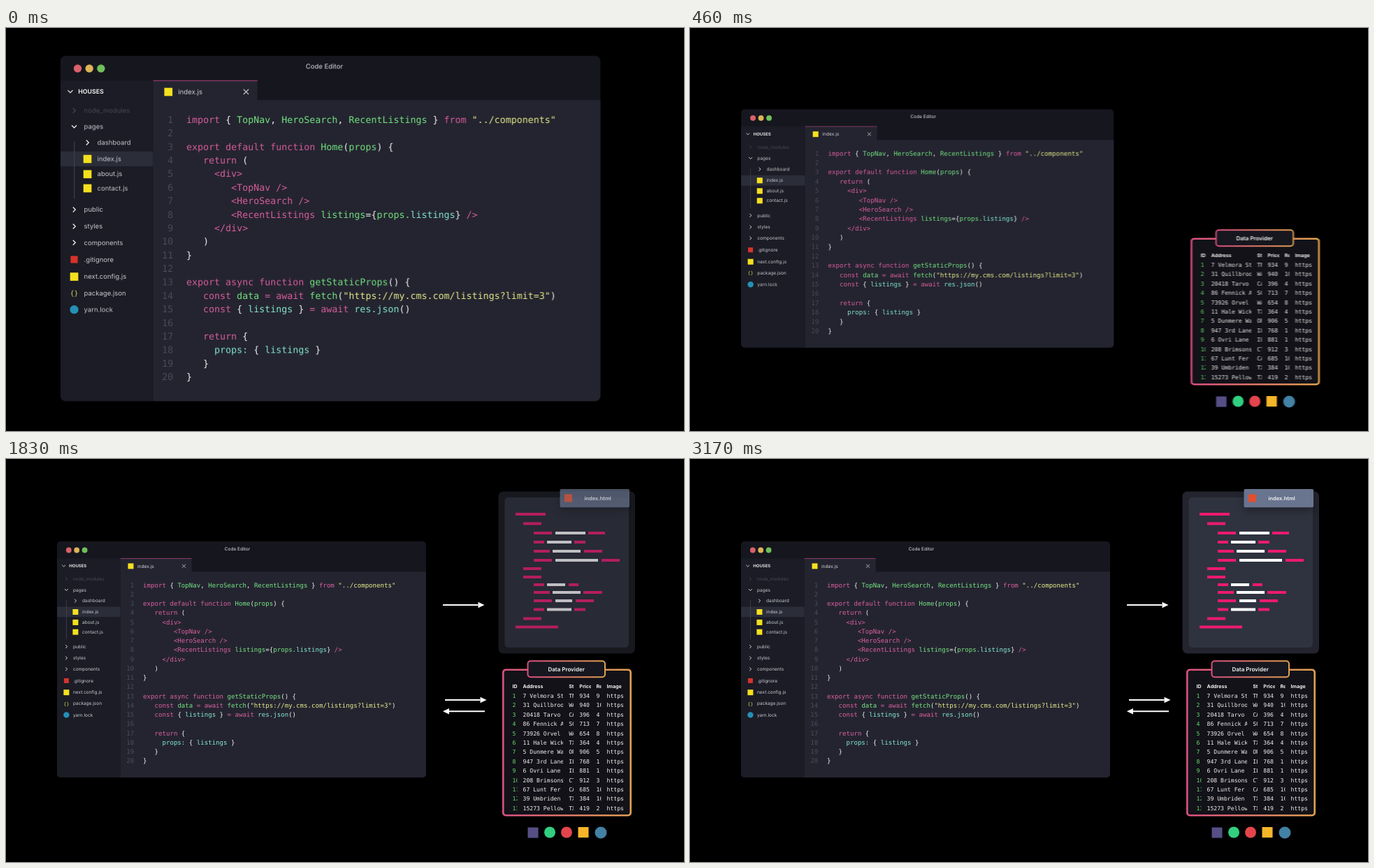
Write an HTML page with a canvas that moves like this. It is 970x577 px and loops after 3.25 s.

```html
<!DOCTYPE html>
<html lang="en">
<head>
<meta charset="utf-8">
<title>Code editor and data provider</title>
<style>
html, body { margin: 0; width: 100%; height: 100%; overflow: hidden; background: #000; }
canvas { display: block; }
</style>
</head>
<body>
<canvas id="stage" width="970" height="577"></canvas>
<script>
const W = 970, H = 577, LOOP = 3250, FRAME = 1000 / 24, SHUTTER = 11;
const stage = document.getElementById('stage').getContext('2d');
const layer = document.createElement('canvas');
layer.width = W;
layer.height = H;
const c = layer.getContext('2d');

const SANS = 'Inter, sans-serif', MONO = '"DejaVu Sans Mono", monospace';
const PINK = '#d9609f', WHITE = '#f2f2f2', YELLOW = '#f4e01f', HOT = '#ee1a70';
const INK = { p: PINK, w: WHITE, g: '#76e583', y: '#e6ec8c', c: '#86e8cf' };

// "~x" switches the ink; the first number is the indent in characters.
const CODE = [
  [0, '~pimport ~w{ ~gTopNav~w, ~gHeroSearch~w, ~gRecentListings ~w} ~pfrom ~y"../components"'],
  [0, ''],
  [0, '~pexport default function ~gHome~w(~gprops~w) {'],
  [3, '~preturn ~w('],
  [5, '~p<div>'],
  [8, '~p<TopNav />'],
  [8, '~p<HeroSearch />'],
  [8, '~p<RecentListings ~glistings~w={~gprops.~clistings~w} ~p/>'],
  [5, '~p</div>'],
  [3, '~w)'],
  [0, '~w}'],
  [0, ''],
  [0, '~pexport async function ~ggetStaticProps~w() {'],
  [3, '~pconst ~gdata ~p= await ~gfetch~w(~y"https://my.cms.com/listings?limit=3"~w)'],
  [3, '~pconst ~w{ ~clistings ~w} ~p= await ~cres.json~w()'],
  [0, ''],
  [3, '~preturn ~w{'],
  [5, '~cprops: ~w{ ~clistings ~w}'],
  [3, '~w}'],
  [0, '~w}']
];

// icon, label, label x, y
const FILES = [
  ['right', 'node_modules', 96, 171.6], ['down', 'pages', 96, 187.3],
  ['right', 'dashboard', 109, 203], ['js', 'index.js', 109, 218.8],
  ['js', 'about.js', 109, 233.7], ['js', 'contact.js', 109, 247.5],
  ['right', 'public', 96, 268.6], ['right', 'styles', 96, 285],
  ['right', 'components', 96, 300.8], ['red', '.gitignore', 96, 317.4],
  ['js', 'next.config.js', 96, 334], ['braces', 'package.json', 96, 350.2],
  ['blue', 'yarn.lock', 96, 366.4]
];

// heading, x, visible width, values
const COLUMNS = [
  ['ID', 724.5, 7, Array.from({ length: 13 }, (_, i) => i + 1)],
  ['Address', 739.5, 57.5, ['7 Velmora Str', '31 Quillbrook', '20418 Tarvo', '86 Fennick Av',
    '73926 Orvel', '11 Hale Wick', '5 Dunmere Wa', '947 3rd Lane', '6 Ovri Lane',
    '208 Brimsons', '67 Lunt Fer', '39 Umbriden', '15273 Pellow']],
  ['State', 805.2, 6.8, 'TN WA CA SC WA TX OR IL IL CT CA TX TX'.split(' ')],
  ['Price', 820.3, 16.5, '934 940 396 713 654 364 906 768 881 912 685 384 419'.split(' ')],
  ['Rev', 844.5, 7, '9 10 4 7 8 4 5 1 1 3 10 10 2'.split(' ')],
  ['Image', 859.5, 26, Array(13).fill('https')]
];

// y, then start and end of each bar; the middle bar of three is white
const BARS = [
  [79, 729, 772], [92.5, 740, 766],
  [106, 755, 781, 786, 829, 833, 857], [119, 755, 770, 774, 809, 813, 829],
  [132, 755, 778, 782, 822, 827, 853], [145, 755, 781, 786, 847, 852, 878],
  [157, 740, 766], [169, 740, 766],
  [180, 755, 770, 774, 800, 805, 819], [191, 755, 778, 782, 822, 826, 853],
  [203, 755, 781, 786, 810, 815, 841], [215.5, 755, 770, 774, 809, 813, 829],
  [228.5, 740, 766], [240.5, 729, 790]
];

const ease = (t, start, length) => {
  const u = Math.min(1, Math.max(0, (t - start) / length));
  return (1 - Math.cos(Math.PI * u)) / 2;
};

function box(x, y, w, h, fill, r = 0) {
  c.fillStyle = fill;
  c.beginPath();
  c.roundRect(x, y, w, h, r);
  c.fill();
}

function dot(x, y, r, fill) {
  c.fillStyle = fill;
  c.beginPath();
  c.arc(x, y, r, 0, 7);
  c.fill();
}

function path(color, width, ...points) {
  c.strokeStyle = color;
  c.lineWidth = width;
  c.beginPath();
  points.forEach(([x, y]) => c.lineTo(x, y));
  c.stroke();
}

// y is the middle of the capitals
function text(str, x, y, size, color, family = SANS, weight = 400, align = 'left') {
  c.font = `${weight} ${size}px ${family}`;
  c.textRendering = 'geometricPrecision';
  c.textAlign = align;
  c.fillStyle = color;
  c.fillText(str, x, y + size * 0.35);
}

function chevron(x, y, down) {
  const tips = down ? [[-2.4, -1.2], [0, 1.2], [2.4, -1.2]] : [[-1.2, -2.4], [1.2, 0], [-1.2, 2.4]];
  return tips.map(([dx, dy]) => [x + dx, y + dy]);
}

function fileIcon(kind, x, y, color) {
  if (kind === 'js') box(x - 4, y - 3.8, 8, 8, YELLOW);
  else if (kind === 'red') box(x - 3.5, y - 3.5, 7, 7, '#d5332c');
  else if (kind === 'blue') dot(x, y, 4.2, '#2590b5');
  else if (kind === 'braces') text('{}', x, y, 6.6, '#d8d35a', MONO, 400, 'center');
  else path(color, 0.9, ...chevron(x, y, kind === 'down'));
}

function sidebar() {
  box(73, 142.5, 90.6, 313.5, '#1b1c25', [0, 0, 0, 5]);
  box(73, 211.6, 90.6, 14.7, '#2b2d39');
  box(86.1, 202, 0.8, 56, '#41434f');
  path('#ddd', 0.9, ...chevron(82.6, 153, true));
  text('HOUSES', 90.3, 153, 6, '#e4e4e6', SANS, 700);
  FILES.forEach(([icon, label, x, y], i) => {
    const color = i ? '#c9cad0' : '#4a4b55';
    fileIcon(icon, x - 9.6, y, i ? '#f2f2f2' : color);
    text(label, x, y, 6.5, color);
  });
}

function codeLines() {
  const step = 5.475;
  CODE.forEach(([indent, line], i) => {
    const y = 180.5 + i * 13.25;
    text(i + 1, 183.2, y, 9.1, '#4b4c59', MONO, 400, 'right');
    let col = indent;
    for (const part of line.split('~').slice(1)) {
      const word = part.slice(1);
      text(word, 196.1 + col * step, y, 9.1, INK[part[0]], MONO);
      col += word.length;
    }
  });
}

function editor(rest) {
  const scale = 1 + 0.47 * rest;
  c.save();
  c.translate(73 + 5 * rest, 287);
  c.scale(scale, scale);
  c.translate(-73, -287);
  box(73, 118, 528, 338, '#16171e', 5);
  box(163.6, 161.4, 437.4, 294.6, '#242430', [0, 0, 5, 0]);
  sidebar();
  box(163.6, 142.3, 102, 20, '#242430');
  box(163.6, 142, 102, 0.9, '#8c3c69');
  ['#d9626a', '#dcb558', '#70bf5b'].forEach((color, i) => dot(89.8 + i * 11.4, 130.5, 3.9, color));
  text('Code Editor', 331, 128.5, 6.5, '#c4c5ca', SANS, 500, 'center');
  fileIcon('js', 178.5, 153.2);
  text('index.js', 188, 153.2, 6.6, '#d4d5da');
  path('#d0d0d5', 0.8, [252, 150.8], [257, 155.8]);
  path('#d0d0d5', 0.8, [257, 150.8], [252, 155.8]);
  codeLines();
  c.restore();
}

function frame(x, y, w, h, fill, line) {
  const edge = c.createLinearGradient(x, 0, x + w, 0);
  edge.addColorStop(0, '#d94f82');
  edge.addColorStop(1, '#dfa150');
  box(x, y, w, h, edge, 5);
  box(x + line, y + line, w - 2 * line, h - 2 * line, fill, 3);
}

function cell(str, x, y, width, ...style) {
  c.save();
  c.beginPath();
  c.rect(x, y - 8, width, 16);
  c.clip();
  text(str, x, y, ...style);
  c.restore();
}

function provider(rest) {
  c.save();
  c.translate(286 * rest, 0);
  frame(710, 300.5, 185, 211, '#121218', 2.6);
  frame(745.5, 288.3, 112.5, 25, '#17171f', 2);
  text('Data Provider', 801.6, 301, 8, '#f4f4f4', SANS, 600, 'center');
  COLUMNS.forEach(([name, x, width, values], col) => {
    cell(name, x, 325.8, width, 7.1, WHITE, SANS, 700);
    values.forEach((value, i) =>
      cell(value, x, 339.2 + i * 13.4, width, 8.15, col ? WHITE : '#66dd6c', MONO));
  });
  box(746.5, 527.5, 15, 15, '#554f86');
  dot(778, 534.5, 8, '#32cf80');
  dot(802, 534.5, 8, '#e4454c');
  box(818.5, 527, 15, 15, '#f6b62a');
  dot(851, 535, 8.5, '#4381a5');
  c.restore();
}

function arrow(from, to, y, amount) {
  if (amount < 0.02) return;
  const dir = Math.sign(to - from), tip = from + (to - from) * amount;
  const neck = tip - dir * Math.min(9, Math.abs(tip - from));
  path('#fff', 2, [from, y], [neck, y]);
  c.fillStyle = '#fff';
  c.beginPath();
  c.moveTo(tip, y);
  c.lineTo(neck, y - 4.2);
  c.lineTo(neck, y + 4.2);
  c.fill();
}

function htmlPanel(alpha) {
  if (!alpha) return;
  c.save();
  c.globalAlpha = alpha;
  box(704.5, 46.5, 195.5, 232, '#23242d', 7);
  box(713.5, 55, 177.5, 215, '#2f333f', 5);
  c.shadowColor = 'rgba(0,0,0,.3)';
  c.shadowBlur = 12;
  c.shadowOffsetY = 5;
  box(792.5, 43, 99.5, 26.3, '#69748f', 2);
  c.shadowColor = 'transparent';
  box(799, 50.5, 11, 11, '#e2502c');
  text('index.html', 827.5, 56.3, 7.5, WHITE, SANS, 600);
  for (const [y, ...ends] of BARS)
    for (let i = 0; i < ends.length; i += 2)
      box(ends[i], y - 2, ends[i + 1] - ends[i], 4, i === 2 ? '#fff' : HOT);
  c.restore();
}

function scene(t) {
  const rest = 1 - ease(t, -42, 552);
  c.fillStyle = '#000';
  c.fillRect(0, 0, W, H);
  editor(rest);
  provider(rest);
  arrow(628, 687.5, 345, ease(t, 580, 260));
  arrow(685, 625, 361.3, ease(t, 900, 250));
  arrow(625, 684.5, 209, ease(t, 1180, 250));
  htmlPanel(ease(t, 1580, 400));
}

// Average several moments inside the shutter to blur what moves.
function draw(t) {
  const samples = t < 1450 ? 8 : 1;
  for (let i = 0; i < samples; i++) {
    scene(t + SHUTTER * ((i + 0.5) / samples - 0.5));
    stage.globalAlpha = 1 / (i + 1);
    stage.drawImage(layer, 0, 0);
  }
}

let start, shown;
function tick(now) {
  start ??= now;
  const step = Math.floor((((now - start) % LOOP) + 5) / FRAME);
  if (step !== shown) draw(step * FRAME);
  shown = step;
  requestAnimationFrame(tick);
}
requestAnimationFrame(tick);
</script>
</body>
</html>
```
